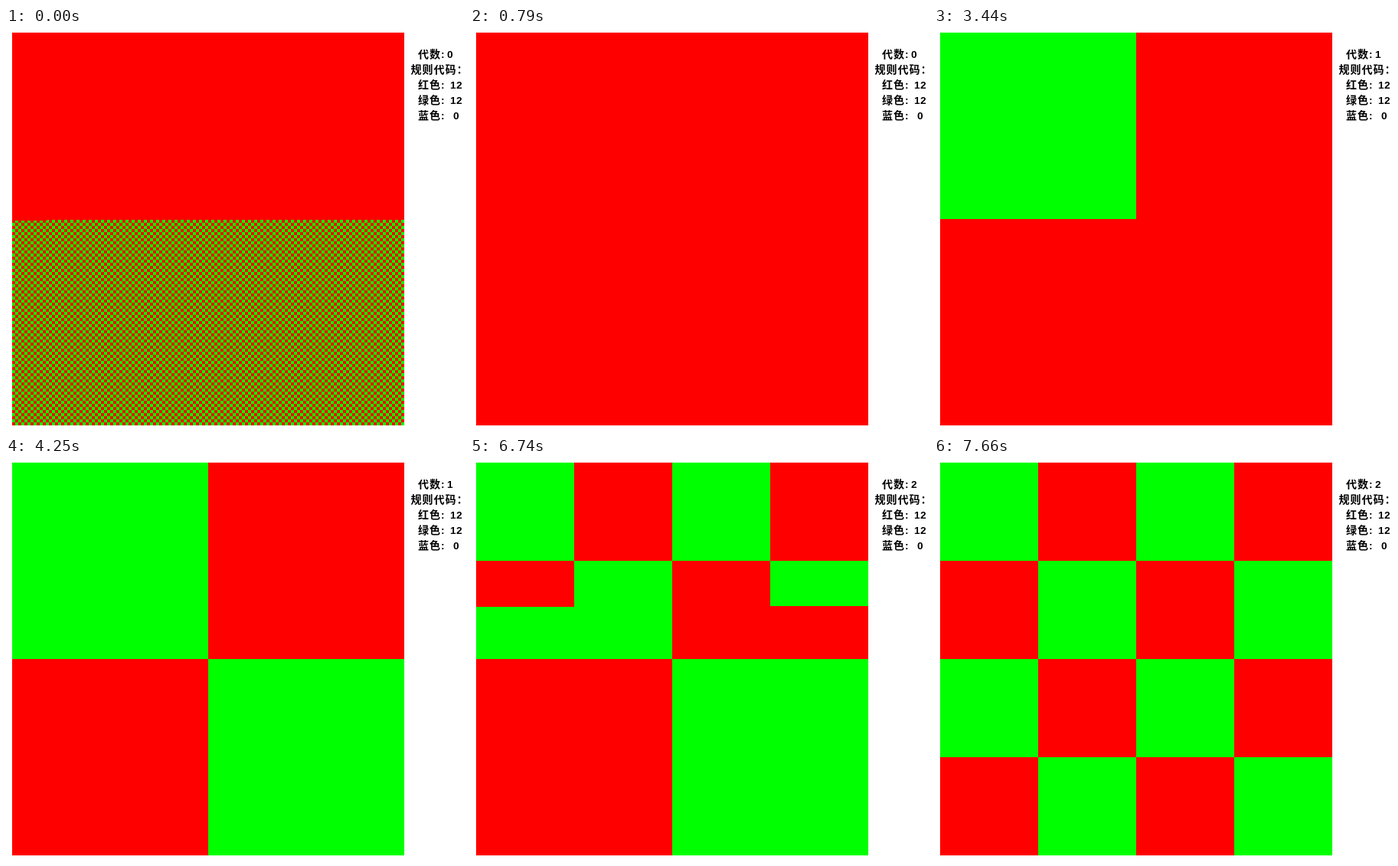
Animation, 598 px wide and 524 px high, one loop 8 s. Source, as an HTML page with a canvas:

```html
<!DOCTYPE html>
<html lang="zh-CN">
<head>
<meta charset="utf-8">
<title>代数</title>
<style>
  html, body { margin: 0; width: 598px; height: 524px; overflow: hidden; background: #fff; }
  canvas { position: absolute; left: 8px; top: 6px; }
  svg { position: absolute; left: 0; top: 0; }
  text { font: bold 13.5px "Liberation Sans", sans-serif; letter-spacing: .5px; }
  .cjk { font: bold 14px "Noto Sans CJK SC", "Noto Sans CJK", sans-serif; letter-spacing: 1px; }
</style>
</head>
<body>
<canvas id="board" width="512" height="512"></canvas>
<svg width="598" height="524">
  <text y="39"><tspan class="cjk" x="538">代数</tspan><tspan x="568">:</tspan><tspan x="576" id="gen">0</tspan></text>
  <text y="59"><tspan class="cjk" x="528.5">规则代码：</tspan></text>
  <text y="79"><tspan class="cjk" x="538">红色</tspan><tspan x="568">:</tspan><tspan x="580">12</tspan></text>
  <text y="99"><tspan class="cjk" x="538">绿色</tspan><tspan x="568">:</tspan><tspan x="580">12</tspan></text>
  <text y="119"><tspan class="cjk" x="538">蓝色</tspan><tspan x="568">:</tspan><tspan x="584">0</tspan></text>
</svg>
<script>
const LOOP = 8000, SIZE = 512;
const ctx = document.getElementById('board').getContext('2d');
const label = document.getElementById('gen');

// A sweep repaints the board from the top: `first` rows at `start`,
// then `pace` more rows every `tick` ms.
const sweeps = [
  { gen: 0, prev: 7, start: 0, tick: 131.5, first: 244.09, pace: 48.5 },
  { gen: 1, prev: 0, start: 2900, tick: 135, first: 37, pace: 51.5 },
  { gen: 2, prev: 1, start: 6320, tick: 133.3, first: 33, pace: 51.57 }
];

// Generation n is a checkerboard of 2^n by 2^n cells; generation 0 is plain red.
function drawGrid(gen) {
  const n = 2 ** gen, cell = SIZE / n;
  ctx.fillStyle = '#f00';
  ctx.fillRect(0, 0, SIZE, SIZE);
  if (!gen) return;
  ctx.fillStyle = '#0f0';
  for (let y = 0; y < n; y++)
    for (let x = y % 2; x < n; x += 2) ctx.fillRect(x * cell, y * cell, cell, cell);
}

function draw({ gen, prev }, progress) {
  const rows = Math.floor(progress);
  const part = Math.round((progress - rows) * SIZE);
  drawGrid(prev);
  ctx.save();
  ctx.beginPath();
  ctx.rect(0, 0, SIZE, rows);
  ctx.rect(0, rows, part, 1);
  ctx.clip();
  drawGrid(gen);
  ctx.restore();
  label.textContent = gen;
}

function frame() {
  const t = performance.now() % LOOP;
  const sweep = sweeps.findLast(s => s.start <= t);
  const ticks = Math.floor((t - sweep.start) / sweep.tick);
  draw(sweep, Math.min(SIZE, sweep.first + ticks * sweep.pace));
  requestAnimationFrame(frame);
}
frame();
</script>
</body>
</html>
```
